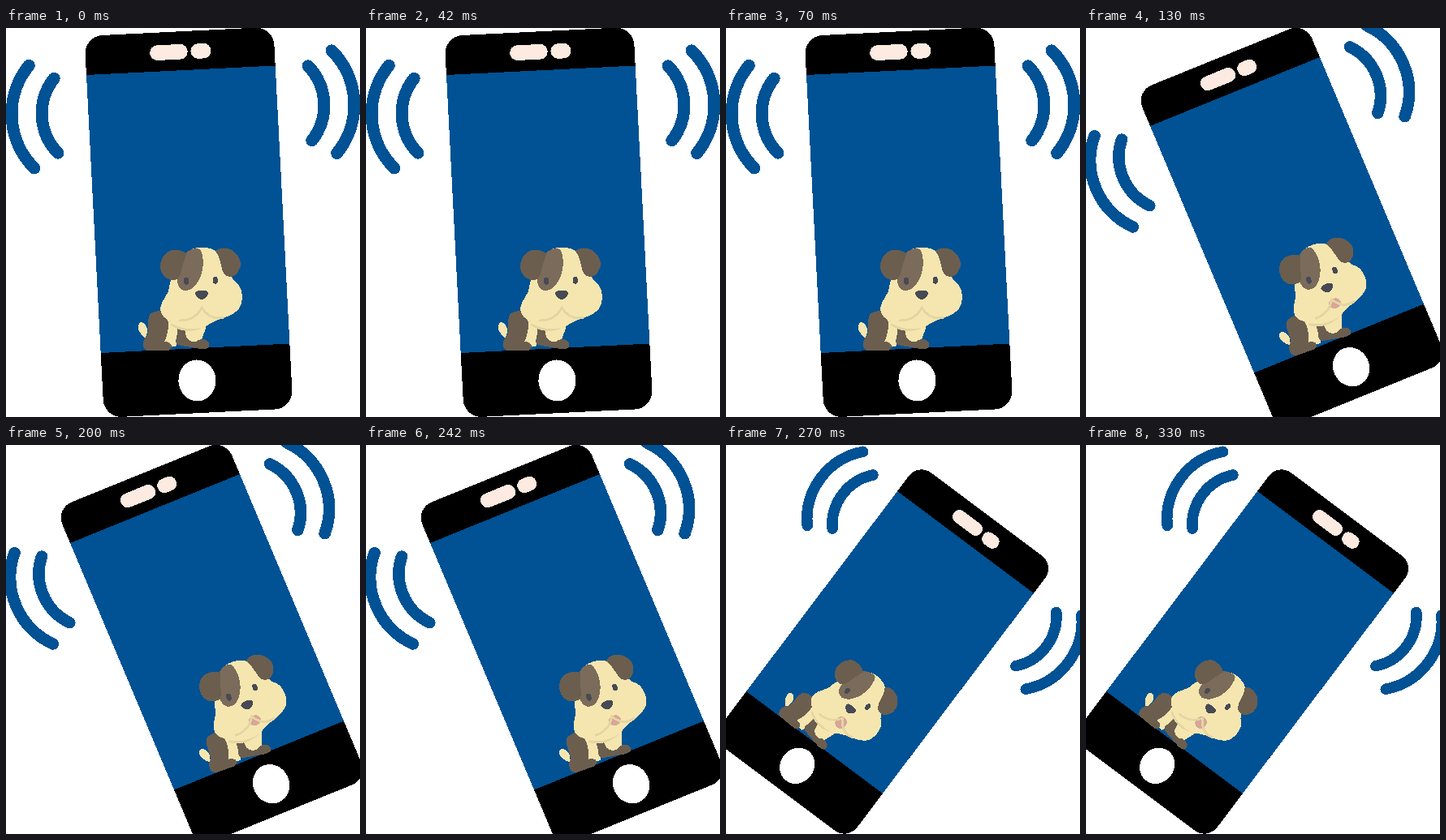
An HTML page that plays this animation: 436 px wide and 480 px high, repeating every 390 ms.

```html
<!DOCTYPE html>
<html lang="en">
<head>
<meta charset="utf-8">
<title>Ringing phone</title>
<style>
  html, body { margin: 0; width: 100%; height: 100%; overflow: hidden; background: #fff; }
  svg { display: block; width: 100vw; height: 100vh; }
  .cream { fill: #f5e6b0; }
  .brown { fill: #6b5e4f; }
  .ink { fill: #474a54; }
  .shade { fill: none; stroke: #e5d5a2; stroke-width: 3; stroke-linecap: round; }
</style>
</head>
<body>
<svg viewBox="0 0 436 480" shape-rendering="crispEdges">
  <defs>
    <g id="waves" fill="none" stroke="#005294" stroke-width="15" stroke-linecap="round">
      <path d="M-70 -15.2A94.5 94.5 0 0 0 -70 111.6"/>
      <path d="M-40 2.3A70 70 0 0 0 -40 94.4"/>
    </g>
  </defs>

  <!-- Local origin: top left corner of the 233 by 343.5 screen -->
  <g id="phone">
    <use href="#waves"/>
    <use href="#waves" transform="translate(233.3) scale(-1 1)"/>
    <rect y="-48" width="233" height="471.5" rx="22"/>
    <rect width="233" height="343.5" fill="#005294"/>
    <g fill="#fdeae0">
      <rect x="79.5" y="-32.3" width="46.5" height="18.6" rx="9"/>
      <rect x="129.8" y="-32" width="25" height="18.6" rx="9"/>
    </g>
    <ellipse cx="116.8" cy="383.3" rx="23" ry="25.5" fill="#fff"/>

    <g id="dog" transform="rotate(2.9) translate(-99 -58)">
      <path class="cream" d="M172 383C163 378 160 367 164 364C169 361 173 367 174 373Z"/>
      <path class="cream" d="M190 347C185 362 192 384 198 393H209L214 376L222 391H240C239 383 246 376 247 362L235 345Z"/>
      <path class="brown" d="M177 353C183 348 194 347 197 354C202 364 199 378 195 387C206 387 206 398 198 398H174C167 397 167 387 171 382C178 376 172 362 177 353Z"/>
      <path class="brown" d="M211 371C216 368 221 371 221 378C221 385 229 388 234 387C237 382 250 383 250 391C250 396 246 396 240 396L216 392C207 391 208 386 210 381Z"/>
      <path class="shade" d="M204 366Q223 378 244 367"/>
      <path class="cream" d="M222 277C231 269 250 268 259 276C270 286 273 303 281 312C293 318 293 341 285 348C277 357 262 358 252 364C240 374 218 373 206 363C197 361 189 354 190 345C191 335 201 329 201 318C203 304 212 288 222 277Z"/>
      <path d="M221 278C227 272 234 271 239 273C245 284 243 303 236 313C231 322 221 328 214 321C207 313 210 288 221 278Z" fill="#7b6b5a"/>
      <path class="brown" d="M222 279C218 273 206 273 201 275C193 279 189 288 190 297C192 307 200 312 208 311C214 310 215 302 217 294Z"/>
      <path class="brown" d="M258 275C265 269 275 271 281 276C289 283 291 293 286 300C282 307 275 309 269 304C264 298 265 284 258 275Z"/>
      <g class="ink">
        <ellipse cx="222" cy="312" rx="3.2" ry="4.6"/>
        <ellipse cx="257.5" cy="311" rx="3.2" ry="4.6"/>
        <path d="M234 325C238 323 245 323 248 325C251 328 246 334 241 335C237 335 230 328 234 325Z"/>
      </g>
      <ellipse id="tongue" cx="243" cy="351" rx="7.8" fill="#d8a699"/>
      <path class="shade" d="M214 361Q232 361 241 345Q251 361 267 357"/>
    </g>
  </g>
</svg>
<script>
  const LOOP = 390, W = 233, H = 343.5;

  // Screen corners: top left, top right, bottom left
  const poses = [
    { at: 0,   tl: [99, 58],  tr: [331.7, 46.5], bl: [116.7, 401],  tongue: 0 },
    { at: 130, tl: [79, 121], tr: [288, 36],     bl: [207, 425.5],  tongue: 6.5 },
    { at: 270, tl: [211, 57], tr: [379, 183],    bl: [25, 304],     tongue: 8.5 }
  ];

  const phone = document.getElementById("phone");
  const tongue = document.getElementById("tongue");

  const axis = (from, to, size) => to.map((v, i) => (v - from[i]) / size);

  function draw(ms) {
    const t = ms % LOOP;
    const pose = poses.findLast(p => p.at <= t);
    const m = [...axis(pose.tl, pose.tr, W), ...axis(pose.tl, pose.bl, H), ...pose.tl];
    phone.setAttribute("transform", `matrix(${m.join(" ")})`);
    tongue.setAttribute("ry", pose.tongue);
  }

  const start = performance.now();
  function tick() {
    draw(performance.now() - start);
    requestAnimationFrame(tick);
  }
  tick();
</script>
</body>
</html>
```
